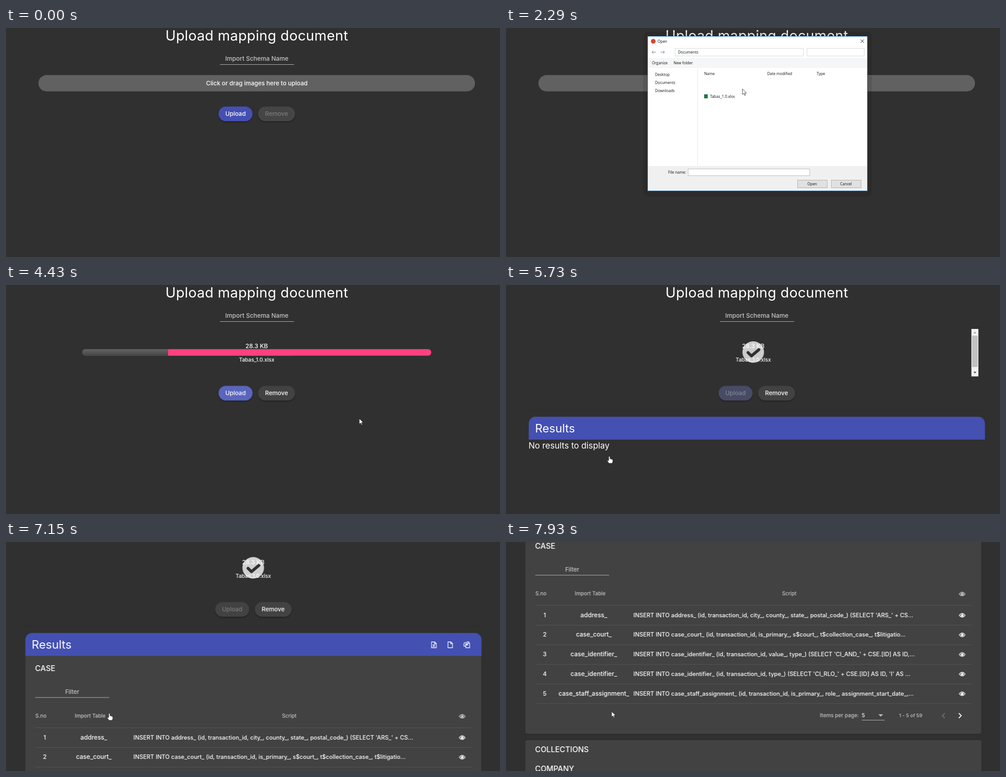
These frames come from a looping animation (1097x511 px, 8 s). An HTML page:

```html
<!DOCTYPE html>
<html lang="en">
<head>
<meta charset="utf-8">
<title>Upload mapping document</title>
<style>
html, body { margin: 0; width: 100%; height: 100%; overflow: hidden; background: #303030; }
svg { display: block; width: 100%; height: 100%; }
text { font: 500 13.3px Inter, "Open Sans", sans-serif; fill: #fff; white-space: pre; }
.mid { text-anchor: middle; }
.h1 { font-size: 31px; font-weight: 400; letter-spacing: .4px; }
.h2 { font-size: 25.8px; font-weight: 400; }
.h3 { font-size: 18.7px; font-weight: 400; }
.panel-title { font-size: 16.9px; }
.small { font-size: 11.6px; }
.head { font-size: 11.4px; fill: #c6c6c6; }
.soft { fill: #c6c6c6; }
.name { font-size: 13.8px; }
.script { font-size: 12.85px; }
.win text { font: 8.4px "Open Sans", sans-serif; fill: #111; }
.rule { stroke: #575757; }
.field { stroke: #bdbdbd; }
.icon { fill: none; stroke: #fff; stroke-width: 1.4; }
.panel { fill: #424242; stroke: #2a2a2a; stroke-width: 2; paint-order: stroke; }

/* One loop is 8 s, so 1% is 80 ms. */
.cut { animation: 8s step-end infinite; }
.flow { animation: 8s linear infinite; }

.drop { animation-name: drop; }
@keyframes drop { 0% { opacity: 1 } 38.375% { opacity: 0 } }
.item { animation-name: item; }
@keyframes item { 0% { opacity: 0 } 38.375% { opacity: 1 } }
.buttons { animation-name: buttons; }
@keyframes buttons { 0% { transform: none } 38.375% { transform: translateY(49.7px) } }
.remove { animation-name: remove; }
@keyframes remove { 0% { fill: #7c7c7c } 38.375% { fill: #fff } }
.remove-bg { animation-name: remove-bg; }
@keyframes remove-bg { 0% { fill: #444 } 38.375% { fill: #424242 } }
.results { animation-name: results; }
@keyframes results { 0% { opacity: 0 } 61.875% { opacity: 1 } }
.empty { animation-name: empty; }
@keyframes empty { 0% { opacity: 0 } 61.875% { opacity: 1 } 73.125% { opacity: 0 } }
.loaded { animation-name: loaded; }
@keyframes loaded { 0% { opacity: 0 } 73.125% { opacity: 1 } }
.nudge { animation-name: nudge; }
@keyframes nudge { 0% { transform: none } 61.875% { transform: translateX(-7.5px) } 73.125% { transform: none } }
.narrow { animation-name: narrow; }
@keyframes narrow { 0% { transform: none } 73.125% { transform: translateX(-7.5px) } }

.scroll { animation-name: scroll; }
@keyframes scroll {
  0%, 87.5% { transform: none }
  89.2%, 97.4% { transform: translateY(-91px) }
  97.5% { transform: translateY(-228px) }
  99%, 100% { transform: translateY(-364px) }
}
.upload-bg { animation-name: upload-bg; }
@keyframes upload-bg {
  0%, 52% { fill: #4450b2 }
  53%, 62% { fill: #5a65bd }
  71.6% { fill: #474b66 }
  73.1%, 100% { fill: #424242 }
}
.upload { animation-name: upload; }
@keyframes upload { 0%, 62% { fill: #fff } 71.6% { fill: #858795 } 73.1%, 100% { fill: #7c7c7c } }
.pulse { animation-name: pulse; transform-origin: 556.75px 150.5px; animation-timing-function: ease; }
@keyframes pulse { 0%, 38.375% { transform: none } 45.875% { transform: scale(1.1) } 53.375%, 100% { transform: none } }
.fill { animation-name: fill; transform-origin: 169px 0; animation-timing-function: ease-in-out; }
@keyframes fill { 0%, 54.1% { transform: scaleX(0) } 57.85%, 100% { transform: none } }
.fade { animation-name: fade; }
@keyframes fade { 0%, 61.875% { opacity: 1 } 66.875%, 100% { opacity: 0 } }
.mark { animation-name: mark; animation-timing-function: cubic-bezier(.77, 0, .175, 1); }
@keyframes mark {
  0%, 62.6% { opacity: 0; transform: translateY(40px) }
  73.9%, 88.9% { opacity: 1; transform: none }
  100% { opacity: 0; transform: translateY(-40px) }
}
.rest, .gap, .case { animation-timing-function: cubic-bezier(.4, 0, .2, 1); }
.rest { animation-name: rest; }
@keyframes rest { 0%, 85% { transform: translateY(-418px) } 87.8%, 100% { transform: none } }
.gap { animation-name: gap; }
@keyframes gap { 0%, 85% { opacity: 0 } 87.8%, 100% { opacity: 1 } }
.case { animation-name: case; }
@keyframes case { 0%, 85% { transform: translateY(-6px) } 87.8%, 100% { transform: none } }

.win { animation-name: win; }
@keyframes win { 0% { opacity: 0 } 20.625% { opacity: 1 } 35.75% { opacity: 0 } }
.win-body { animation-name: win-body; }
@keyframes win-body { 0% { opacity: 0 } 21.875% { opacity: 1 } }
.files { animation-name: files; }
@keyframes files { 0% { opacity: 0 } 23.75% { opacity: 1 } }
.picked { animation-name: picked; }
@keyframes picked { 0% { opacity: 0 } 32.5% { opacity: 1 } }

.cursor { animation-name: cursor; }
@keyframes cursor {
  0%, 1.25% { transform: translate(662px, 9px) }
  2.375%, 9.375% { transform: translate(812px, 75px) }
  12.5% { transform: translate(650px, 163px) }
  14.75%, 27.1% { transform: translate(549px, 131px) }
  32.5%, 38.4% { transform: translate(464.5px, 148px) }
  43.75% { transform: translate(500px, 272px) }
  49.5%, 52.5% { transform: translate(506px, 240px) }
  55.3%, 64.6% { transform: translate(784.5px, 298px) }
  71.5%, 97.4% { transform: translate(229.5px, 382px) }
  99%, 100% { transform: translate(234.5px, 378px) }
}
.arrow { animation-name: arrow; }
@keyframes arrow {
  0% { opacity: 0 } 1.25% { opacity: 1 } 14.75% { opacity: 0 } 18.125% { opacity: 1 }
  47% { opacity: 0 } 53% { opacity: 1 } 71% { opacity: 0 } 97.5% { opacity: 1 }
}
.hand { animation-name: hand; }
@keyframes hand {
  0% { opacity: 0 } 14.75% { opacity: 1 } 18.125% { opacity: 0 }
  47% { opacity: 1 } 53% { opacity: 0 } 71% { opacity: 1 } 97.5% { opacity: 0 }
}
</style>
</head>
<body>
<svg viewBox="0 0 1097 511" preserveAspectRatio="none">
  <defs>
    <linearGradient id="grey" x2="0" y2="1"><stop stop-color="#666"/><stop offset="1" stop-color="#444"/></linearGradient>
    <clipPath id="pill"><rect x="169" y="143" width="775.5" height="15" rx="7.5"/></clipPath>
    <mask id="tick">
      <circle cx="556.5" cy="148.6" r="24" fill="#fff"/>
      <path d="M545 149.8L552.5 157.3L569 143.3" fill="none" stroke="#000" stroke-width="6.5" stroke-linecap="round" stroke-linejoin="round"/>
    </mask>
    <filter id="lift" x="-20%" y="-20%" width="140%" height="160%"><feDropShadow dx="0" dy="2" stdDeviation="1.5" flood-opacity=".35"/></filter>
    <g id="eye">
      <path d="M-6.5 0Q0 -8.8 6.5 0Q0 8.8 -6.5 0Z" fill="none" stroke="currentColor" stroke-width="1.3"/>
      <circle r="3.2" fill="currentColor"/>
      <path d="M-1.6 -.2Q-1.5 -1.7 0 -1.8" fill="none" stroke="#424242" stroke-width=".9"/>
    </g>
  </defs>
  <rect width="1097" height="511" fill="#303030"/>

  <g class="flow scroll"><g class="cut narrow">
    <text class="h1 mid" x="557" y="28">Upload mapping document</text>
    <text class="soft mid" x="557" y="73.3" style="font-size:13.6px">Import Schema Name</text>
    <path class="field" d="M475 81.5H639.5"/>

    <g class="cut drop">
      <rect x="72" y="105" width="969.5" height="36.5" rx="18.2" fill="#616161"/>
      <text class="mid" x="557" y="128">Click or drag images here to upload</text>
    </g>

    <g class="cut item"><g class="cut nudge">
      <g class="flow fade"><g class="flow pulse"><g clip-path="url(#pill)">
        <rect x="169" y="143" width="775.5" height="15" fill="#ff4081"/>
        <rect class="flow fill" x="169" y="143" width="775.5" height="15" fill="url(#grey)"/>
      </g></g></g>
      <g class="flow mark"><rect x="530" y="122" width="53" height="53" fill="#fff" fill-opacity=".78" mask="url(#tick)"/></g>
      <text class="mid" x="556.7" y="140.6">28.3 KB</text>
      <text class="small mid" x="556.7" y="171.4">Tabas_1.0.xlsx</text>
    </g></g>

    <g class="cut buttons">
      <rect class="flow upload-bg" x="472" y="175.3" width="75.5" height="32.6" rx="16.3" filter="url(#lift)"/>
      <text class="flow upload mid" x="509.7" y="196">Upload</text>
      <rect class="cut remove-bg" x="559.8" y="175.3" width="82" height="32.6" rx="16.3" filter="url(#lift)"/>
      <text class="cut remove mid" x="600.8" y="196">Remove</text>
    </g>

    <g class="cut empty">
      <rect x="1033.5" y="98" width="15.5" height="106" fill="#f1f1f1"/>
      <rect x="1035" y="113" width="12.5" height="70" fill="#c1c1c1"/>
      <path d="M1038 108l3.3 -4l3.3 4z" fill="#a3a3a3"/>
      <path d="M1038 193.5l3.3 4l3.3 -4z" fill="#505050"/>
      <text class="h3" x="50" y="365">No results to display</text>
    </g>

    <g class="cut loaded"><g transform="translate(7.5 91)">
      <rect class="panel" x="43" y="253" width="1012.7" height="448" rx="4"/>
      <text class="flow case panel-title" x="64.5" y="288.4">CASE</text>
      <text class="soft mid" x="147" y="339" style="font-size:12.9px">Filter</text>
      <path class="field" d="M65 347H229"/>
      <text class="head mid" x="77.5" y="392">S.no</text>
      <text class="head mid" x="187" y="392">Import Table</text>
      <text class="head mid" x="629" y="392">Script</text>
      <use href="#eye" x="1013" y="389" color="#c6c6c6"/>
      <path class="rule" d="M65 414.5H1033.5"/>
      <g id="rows"></g>
      <text class="small soft" x="697" y="664">Items per page:</text>
      <text class="small" x="790" y="664">5</text>
      <path class="field" d="M790 670.5H841"/>
      <path d="M827 657.5h10.5l-5.25 5z" fill="#c4c4c4"/>
      <text class="soft" x="873" y="664" style="font-size:10.8px">1 - 5 of 59</text>
      <path class="icon" d="M974.5 655l-5.5 5.5l5.5 5.5" style="stroke:#747474;stroke-width:1.8"/>
      <path class="icon" d="M1005.5 655l5.5 5.5l-5.5 5.5" style="stroke-width:2"/>
      <g class="flow rest">
        <g class="flow gap">
          <rect x="40" y="701" width="1020" height="14" fill="#303030"/>
          <path d="M45 701.5H1054" stroke="#262626"/>
        </g>
        <rect class="panel" x="43" y="715" width="1012.7" height="600" rx="4"/>
        <text class="panel-title" x="64.5" y="742.2">COLLECTIONS</text>
        <text class="panel-title" x="64.5" y="785.4">COMPANY</text>
      </g>
    </g></g>

    <g class="cut results">
      <path d="M50 279H1063.5" stroke="#2a2a2a"/>
      <path d="M50.5 345V309a15 15 0 0 1 15 -15H1048.5a15 15 0 0 1 15 15V345Z" fill="#4450b2"/>
      <text class="h2" x="64.5" y="328.5">Results</text>
      <g class="cut loaded"><g class="icon">
        <path d="M952.5 314h7l3.5 3.5v9.5h-10.5zM959 314v4h4M955.5 319.5l4 5.5M959.5 319.5l-4 5.5"/>
        <path d="M989 314h6.5l3.5 3.5v9.5h-10zM995 314v4h4"/>
        <path d="M1028.5 317l3 -3h4v3M1028.5 323.5h-4v-6l3 -3M1028.5 317v6.5M1032.5 317h4.5v10h-8.5v-6zM1032.5 317v4h-4"/>
      </g></g>
    </g>
  </g></g>

  <g class="cut win">
    <rect x="310" y="13.5" width="497.5" height="357" rx="6" fill="none" stroke="#000" stroke-opacity=".1" stroke-width="10"/>
    <g class="cut win-body">
      <rect x="315" y="41" width="487" height="322" fill="#fff"/>
      <rect x="375.5" y="45.5" width="285" height="17" fill="#fff" stroke="#d9d9d9"/>
      <rect x="668.5" y="45.5" width="127" height="17" fill="#fff" stroke="#d9d9d9"/>
      <path d="M333 54h-9m3.5 -3.5l-3.5 3.5l3.5 3.5M343 54h9m-3.5 -3.5l3.5 3.5l-3.5 3.5" fill="none" stroke="#777"/>
      <rect x="315" y="67" width="487" height="22" fill="#f5f6f7"/>
      <text x="324" y="81">Organize</text><text x="372" y="81">New folder</text>
      <rect x="315" y="308" width="487" height="55" fill="#f0f0f0"/>
      <text x="360" y="325">File name:</text>
      <rect x="404.5" y="314.5" width="270" height="15" fill="#fff" stroke="#bbb"/>
      <g fill="#e1e1e1" stroke="#adadad">
        <rect x="647.5" y="339.5" width="66" height="17"/><rect x="722.5" y="339.5" width="66" height="17"/>
      </g>
      <text class="mid" x="680" y="351">Open</text><text class="mid" x="755" y="351">Cancel</text>
      <g class="cut files">
        <text x="382" y="57">Documents</text>
        <text x="331" y="107">Desktop</text><text x="331" y="125">Documents</text><text x="331" y="143">Downloads</text>
        <path d="M425.5 90V307" stroke="#e5e5e5"/>
        <text x="440" y="105">Name</text><text x="580" y="105">Date modified</text><text x="690" y="105">Type</text>
        <g class="cut picked">
          <rect x="432" y="144" width="366" height="18" fill="#cce8ff"/>
          <text x="408" y="325">Tabas_1.0.xlsx</text>
        </g>
        <rect x="440" y="148" width="8" height="9" fill="#1f7a47"/>
        <text x="453" y="156">Tabas_1.0.xlsx</text>
      </g>
    </g>
    <rect x="315" y="18" width="487" height="23" fill="#fff"/>
    <circle cx="327" cy="29.5" r="5.2" fill="#db4437"/>
    <text x="336.5" y="33">Open</text>
    <path d="M787.5 25.5l7.5 7.5m0 -7.5l-7.5 7.5" stroke="#111"/>
    <rect x="314.5" y="18.5" width="488" height="345" fill="none" stroke="#1874bd"/>
  </g>

  <g class="flow cursor" fill="#fff" stroke="#111" stroke-width=".8">
    <path class="cut arrow" d="M0 0V12.5L3 9.8L5 14.5L7 13.6L5 9H9Z"/>
    <path class="cut hand" d="M-1.5 1.5Q0 -1 1.5 1.5V6Q3 5 4 6.5Q5.3 5.8 6 7.2Q8 7 7.8 9V12L6.3 16H-1L-4.6 10.2Q-4.5 8 -1.5 10Z"/>
  </g>
</svg>
<script>
const rows = [
  ["address_", "address_ (id, transaction_id, city_, county_, state_, postal_code_) (SELECT 'ARS_' + CS…"],
  ["case_court_", "case_court_ (id, transaction_id, is_primary_, s$court_, t$collection_case_, t$litigatio…"],
  ["case_identifier_", "case_identifier_ (id, transaction_id, value_, type_) (SELECT 'CI_AND_' + CSE.[ID] AS ID,…"],
  ["case_identifier_", "case_identifier_ (id, transaction_id, type_) (SELECT 'CI_RLO_' + CSE.[ID] AS ID, 'I' AS …"],
  ["case_staff_assignment_", "case_staff_assignment_ (id, transaction_id, is_primary_, role_, assignment_start_date_,…"]
];
document.getElementById("rows").innerHTML = rows.map(([table, script], i) => `
  <g transform="translate(0 ${i * 43.8})">
    <text class="mid" x="86" y="440.5">${i + 1}</text>
    <text class="name mid" x="195" y="440.5">${table}</text>
    <text class="script" x="283" y="440.5">INSERT INTO ${script}</text>
    <use href="#eye" x="1013" y="436.5" color="#fff"/>
    <path class="rule" d="M65 458.5H1033.5"/>
  </g>`).join("");
</script>
</body>
</html>
```
